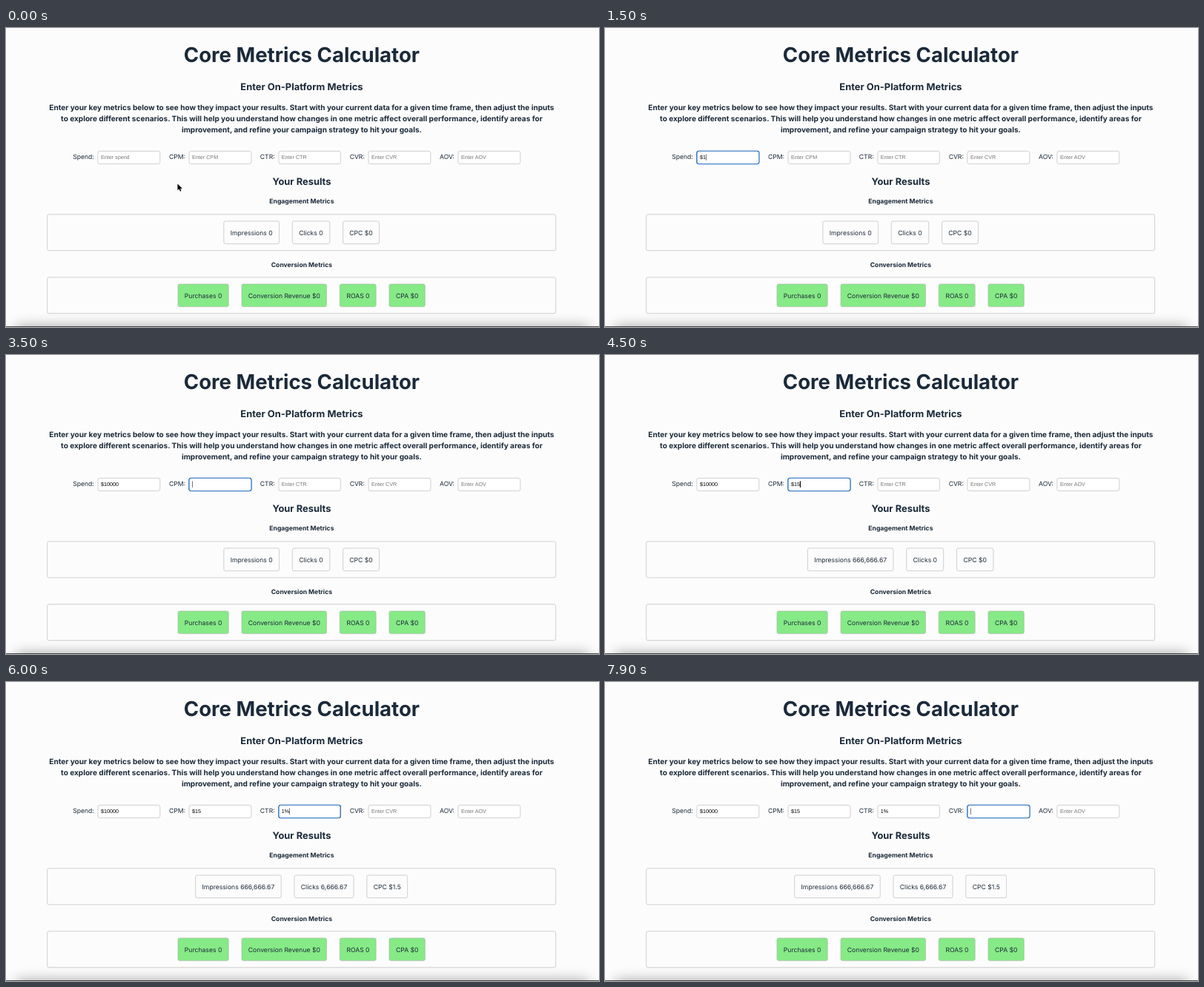
These frames come from a looping animation (800 by 404 pixels, 8 s). An HTML page:

```html
<!DOCTYPE html>
<html lang="en">
<head>
<meta charset="utf-8">
<title>Core Metrics Calculator</title>
<style>
html, body { margin: 0; width: 100%; height: 100%; overflow: hidden; background: #fcfcfc; }
/* The page is laid out 1488 px wide and shown scaled down. */
#page {
  position: absolute; left: 0; top: 0; width: 1488px; height: 752px; overflow: hidden;
  transform: scale(.53763); transform-origin: 0 0;
  font: 16px/24px Inter, sans-serif; font-optical-sizing: none; color: #1b2a3a;
  text-rendering: geometricPrecision;
}
#page > * { position: absolute; margin: 0; box-sizing: border-box; }
.mid { left: 92px; width: 1300px; text-align: center; font-weight: 700; white-space: pre; }
h1 { top: 39px; font-size: 51.2px; line-height: 56px; }
h2 { font-size: 24px; line-height: 36px; }
h3 { top: 186px; font-size: 18.72px; line-height: 28px; }
h4 { font-size: 16px; }
.label { top: 312.4px; text-align: right; width: 120px; }
.input {
  top: 308.8px; width: 156.5px; height: 33.4px; padding: 0 7px; border: 1px solid #aaa; border-radius: 5px;
  background: #fff; color: #000; font: 13.333px/31.4px "Liberation Sans", Arial, sans-serif; white-space: pre;
}
.input.empty { color: #757575; }
.input.focus { border-color: #0f5cb8; box-shadow: 0 0 0 .7px #0f5cb8, inset 0 0 0 .8px #0f5cb8; }
.caret { display: inline-block; width: 1.3px; height: 16px; background: #000; vertical-align: -3px; }
.row {
  left: 103px; width: 1277px; height: 92px; border: 1px solid #aaa; border-radius: 5px;
  display: flex; gap: 32px; justify-content: center; align-items: center;
}
.row span { padding: 16px; border: 1px solid #aaa; border-radius: 5px; white-space: pre; }
.green span { background: #86ea86; }
#shade { left: 30px; width: 1428px; top: 752px; height: 40px; box-shadow: 0 0 32px 4px rgba(0, 0, 0, .32); }
#edge { left: 0; width: 1488px; top: 749.6px; height: 4px; background: #222; }
#pointer { left: 0; top: 0; width: 24px; height: 28px; overflow: visible; }
</style>
</head>
<body>
<div id="page">
  <h1 class="mid">Core Metrics Calculator</h1>
  <h2 class="mid" style="top:130.4px">Enter On-Platform Metrics</h2>
  <h3 class="mid">Enter your key metrics below to see how they impact your results. Start with your current data for a given time frame, then adjust the inputs
to explore different scenarios. This will help you understand how changes in one metric affect overall performance, identify areas for
improvement, and refine your campaign strategy to hit your goals.</h3>
  <h2 class="mid" style="top:367.6px">Your Results</h2>
  <h4 class="mid" style="top:423.3px">Engagement Metrics</h4>
  <div class="row" id="engagement" style="top:468.2px"><span></span><span></span><span></span></div>
  <h4 class="mid" style="top:581.7px">Conversion Metrics</h4>
  <div class="row green" style="top:626.2px"><span>Purchases 0</span><span>Conversion Revenue $0</span><span>ROAS 0</span><span>CPA $0</span></div>
  <div id="shade"></div>
  <div id="edge"></div>
  <svg id="pointer">
    <path id="arrow" d="M0 0V16.5L3.8 13L6.4 19L9.2 17.8L6.7 11.9H12Z" stroke="#fff" stroke-width="1.5" paint-order="stroke"/>
    <path id="beam" d="M-3.5-8Q0-8 0-6V6Q0 8-3.5 8M3.5-8Q0-8 0-6V6Q0 8 3.5 8" fill="none" stroke="#222" stroke-width="1.3"/>
  </svg>
</div>
<script>
const LOOP = 8000;
const page = document.getElementById('page');
const pointer = document.getElementById('pointer');
const arrow = document.getElementById('arrow');
const beam = document.getElementById('beam');
const chips = document.querySelectorAll('#engagement span');

const add = (className, left, text) => {
  const el = document.createElement('div');
  el.className = className;
  el.style.left = left + 'px';
  el.textContent = text;
  page.insertBefore(el, pointer);
  return el;
};

const fields = [['Spend', 230], ['CPM', 459], ['CTR', 683.6], ['CVR', 909], ['AOV', 1134]]
  .map(([name, x]) => {
    add('label', x - 129, name + ':');
    return { hint: 'Enter ' + (name === 'Spend' ? 'spend' : name), el: add('input', x, '') };
  });

// [time, field, value]: the first entry for a field gives it focus.
const keys = [
  [1000, 0, ''], [1200, 0, '$'], [1400, 0, '$1'], [1700, 0, '$10'], [1900, 0, '$100'],
  [2100, 0, '$1000'], [2600, 0, '$10000'],
  [3200, 1, ''], [3900, 1, '$'], [4200, 1, '$1'], [4400, 1, '$15'],
  [5000, 2, ''], [5700, 2, '1'], [5900, 2, '1%'],
  [6500, 3, '']
];

const number = s => parseFloat(s.replace('$', '')) || 0;
const show = n => n.toLocaleString('en-US', { maximumFractionDigits: 2 });

function drawPointer(t) {
  const p = Math.min(1, Math.max(0, (t - 100) / 600));
  const e = p * p * (3 - 2 * p);
  const x = 430.5 - 125 * e, y = 391.5 - 66 * e;
  const inside = y < 342;
  pointer.style.transform = `translate(${x}px, ${y}px)`;
  pointer.style.display = t < 1200 ? '' : 'none';
  arrow.style.display = inside ? 'none' : '';
  beam.style.display = inside ? '' : 'none';
}

function draw(t) {
  const values = fields.map(() => '');
  let focus = -1, last = 0;
  for (const [time, i, value] of keys) {
    if (time > t) break;
    values[i] = value;
    focus = i;
    last = time;
  }
  const caretOn = (t - last) % 1000 < 500;

  fields.forEach(({ el, hint }, i) => {
    const focused = i === focus;
    const empty = !values[i] && !focused;
    el.className = 'input' + (focused ? ' focus' : '') + (empty ? ' empty' : '');
    el.textContent = empty ? hint : values[i];
    if (focused && caretOn) {
      const caret = document.createElement('span');
      caret.className = 'caret';
      el.append(caret);
    }
  });

  const [spend, cpm, ctr] = values.map(number);
  const impressions = cpm ? spend / cpm * 1000 : 0;
  const clicks = impressions * ctr / 100;
  chips[0].textContent = 'Impressions ' + show(impressions);
  chips[1].textContent = 'Clicks ' + show(clicks);
  chips[2].textContent = 'CPC $' + show(clicks ? spend / clicks : 0);
  drawPointer(t);
}

const start = performance.now();
function tick() {
  draw((performance.now() - start) % LOOP);
  requestAnimationFrame(tick);
}
tick();
</script>
</body>
</html>
```
